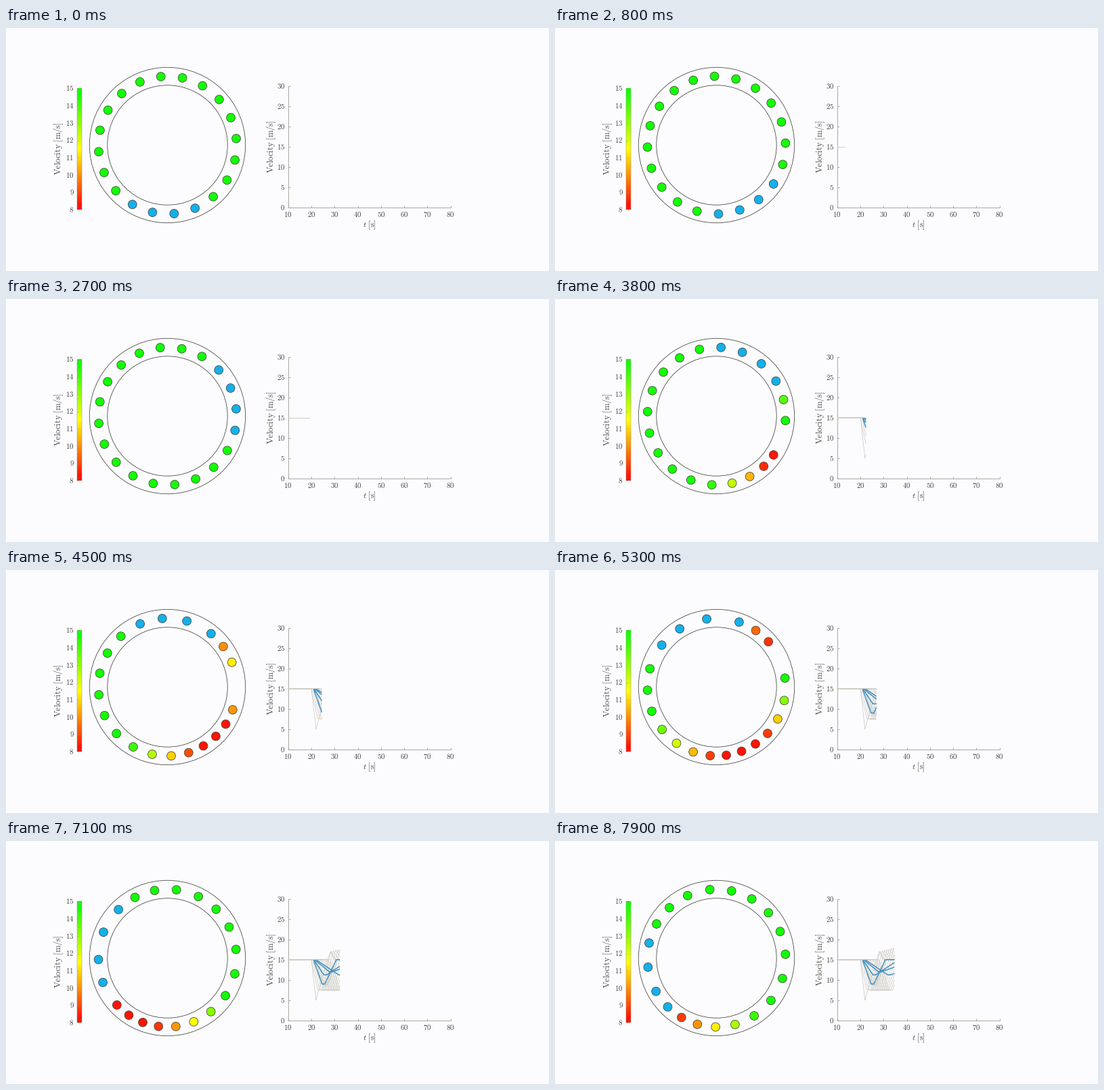
These frames come from a looping animation (802 px wide and 360 px high, 8000 ms). A matplotlib script:

```python
import numpy as np
import matplotlib.pyplot as plt
from matplotlib.animation import FuncAnimation
from matplotlib.collections import LineCollection
from matplotlib.patches import Circle, Rectangle

plt.rcParams["mathtext.fontset"] = "cm"

W, H, DPI = 802, 360, 64
FRAMES, STEP = 80, 100
CARS, AUTO, BRAKER = 20, 4, 6      # the first four cars are controlled
CX, CY, R = 238.5, 173.5, 102
TURN = 4.02                        # degrees per frame in steady flow
V0 = 15
SUB = 6                            # samples per frame
DT = 0.3 / SUB
T0 = 20                            # moment of the disturbance
DEG_PER_M = TURN / (0.3 * V0)

INK, TEXT = "#44443e", "#484844"
AXIS, PALE = "#95958c", "#d0cdc4"
BLUE, CURVE = "#14b0ea", "#3f8fc0"


def pt(px):
    return px * 72 / DPI


def dip(start, low, depth, rise):
    """Slow down, hold for a moment, return to steady speed."""
    return [(start, 0), (low, depth), (low + 1.2, depth),
            (low + 1.2 + rise, 0)]


def wave(n):
    """Stop-and-go wave at the n-th car behind the braking one."""
    end = 6.6 + 0.21 * n
    return [(0.74 * n + s, d) for s, d in (
        (-0.5 - 0.08 * n, 0), (0.3, 3), (2 + 0.04 * n, 7.4), (4.1, 7.6),
        (end, 0), (end + 1, -1.9 - 0.14 * n), (end + 2.6 + 0.4 * n, 0))]


def slowdown(car):
    """Key points (seconds after T0, m/s below steady speed)."""
    if car < AUTO:
        q = AUTO - 1 - car
        return dip(0.9 + 0.12 * q**2, 4.6 + 0.8 * q**2,
                   3 + 0.75 * (car - 1)**2, 5 + 5 * q)
    if car < BRAKER:
        j = car - AUTO + 1
        return dip(0.9 + 0.85 * j, 4.6 + 0.6 * j, 6.3, 4.4)
    if car == BRAKER:
        return [(0, 0), (2, 10), (3.2, 7.5), (7, 0), (8.2, -2), (10, 0)]
    return wave(car - BRAKER)


time = 10 + DT * np.arange(20 + SUB * (FRAMES - 1) + 1)
slow = np.array([np.interp(time - T0, *zip(*slowdown(c)))
                 for c in range(CARS)])
speed = V0 - slow
lost = np.cumsum(slow, axis=1) * DT * DEG_PER_M


def heat(v):
    x = np.clip((v - 8) / 7, 0.04, 0.96)
    return min(1, 2 * (1 - x)), min(1, 2 * x), 0.02


fig = plt.figure(figsize=(W / DPI, H / DPI), dpi=DPI, facecolor="#fcfcfe")
ax = fig.add_axes([0, 0, 1, 1])
ax.axis("off")


def label(x, y, s, size=11, **kw):
    kw = {"ha": "center", "va": "center", **kw}
    ax.text(x, y, f"${s}$", fontsize=pt(size), color=TEXT, **kw)


def line(xs, ys, width=0.8):
    ax.plot(xs, ys, color=AXIS, lw=pt(width), solid_capstyle="butt")


def tx(t):
    return 416.7 + (t - 10) * 240 / 70


def vy(v):
    return 265.8 - 6 * v


# Colour scale
TOP, BOTTOM = 89.7, 269.2
ramp = np.array([[heat(v)] for v in np.linspace(15, 8, 180)])
ax.imshow(ramp, extent=(104.5, 111.5, BOTTOM, TOP), aspect="auto", zorder=1)
ax.add_patch(Rectangle((104.5, TOP), 7, BOTTOM - TOP, fill=False,
                       ec="#80806a", lw=pt(0.4), zorder=2))
for v in range(8, 16):
    y = TOP + (15 - v) * (BOTTOM - TOP) / 7
    line([104.5, 107], [y, y], 0.6)
    label(100.5, y - 0.4, rf"\mathrm{{{v}}}", ha="right")
VELOCITY = r"\mathrm{Velocity\ [m/s]}"
label(78, 178.5, VELOCITY, 12.7, rotation=90)

# Chart axes
line([tx(10)] * 2, [vy(30), vy(0)])
line([tx(10), tx(80)], [vy(0)] * 2)
for v in range(0, 31, 5):
    line([tx(10), tx(10) + 3], [vy(v)] * 2)
    label(412, vy(v), rf"\mathrm{{{v}}}", ha="right")
for t in range(10, 81, 10):
    line([tx(t)] * 2, [vy(0) - 3, vy(0)])
    label(tx(t), 276.5, rf"\mathrm{{{t}}}")
label(391.4, 175.6, VELOCITY, 12.7, rotation=90)
label(537, 292, r"t\ \mathrm{[s]}", 12)

# Road and cars
for r in (115.2, 88.7):
    ax.add_patch(Circle((CX, CY), r, fill=False, ec=INK, lw=pt(0.8)))
dots = [ax.add_patch(Circle((0, 0), 6.4, ec=INK, lw=pt(0.8), zorder=4))
        for _ in range(CARS)]

auto = LineCollection([], colors=CURVE, linewidths=pt(1.5), zorder=3)
human = LineCollection([], colors=PALE, linewidths=pt(0.8), zorder=2)
ax.add_collection(auto, autolim=False)
ax.add_collection(human, autolim=False)
ax.set(xlim=(0, W), ylim=(H, 0))

curves = [np.column_stack([tx(time), vy(v)]) for v in speed]
# Controlled cars stand out only once they leave the steady speed.
first = [np.argmax(slow[c] > 0.1) for c in range(AUTO)]


def draw(frame):
    i = 20 + SUB * frame
    for c, dot in enumerate(dots):
        a = np.radians(-66.5 - 18 * c + TURN * frame - lost[c, i])
        dot.center = CX + R * np.cos(a), CY - R * np.sin(a)
        dot.set_facecolor(BLUE if c < AUTO else heat(speed[c, i]))
    auto.set_segments([p[k:i + 1] for p, k in zip(curves, first) if i > k])
    human.set_segments([p[:i + 1] for p in curves[AUTO:]] if frame else [])
    return [*dots, auto, human]


anim = FuncAnimation(fig, draw, frames=FRAMES, interval=STEP, repeat=True,
                     repeat_delay=0)
plt.show()
```
